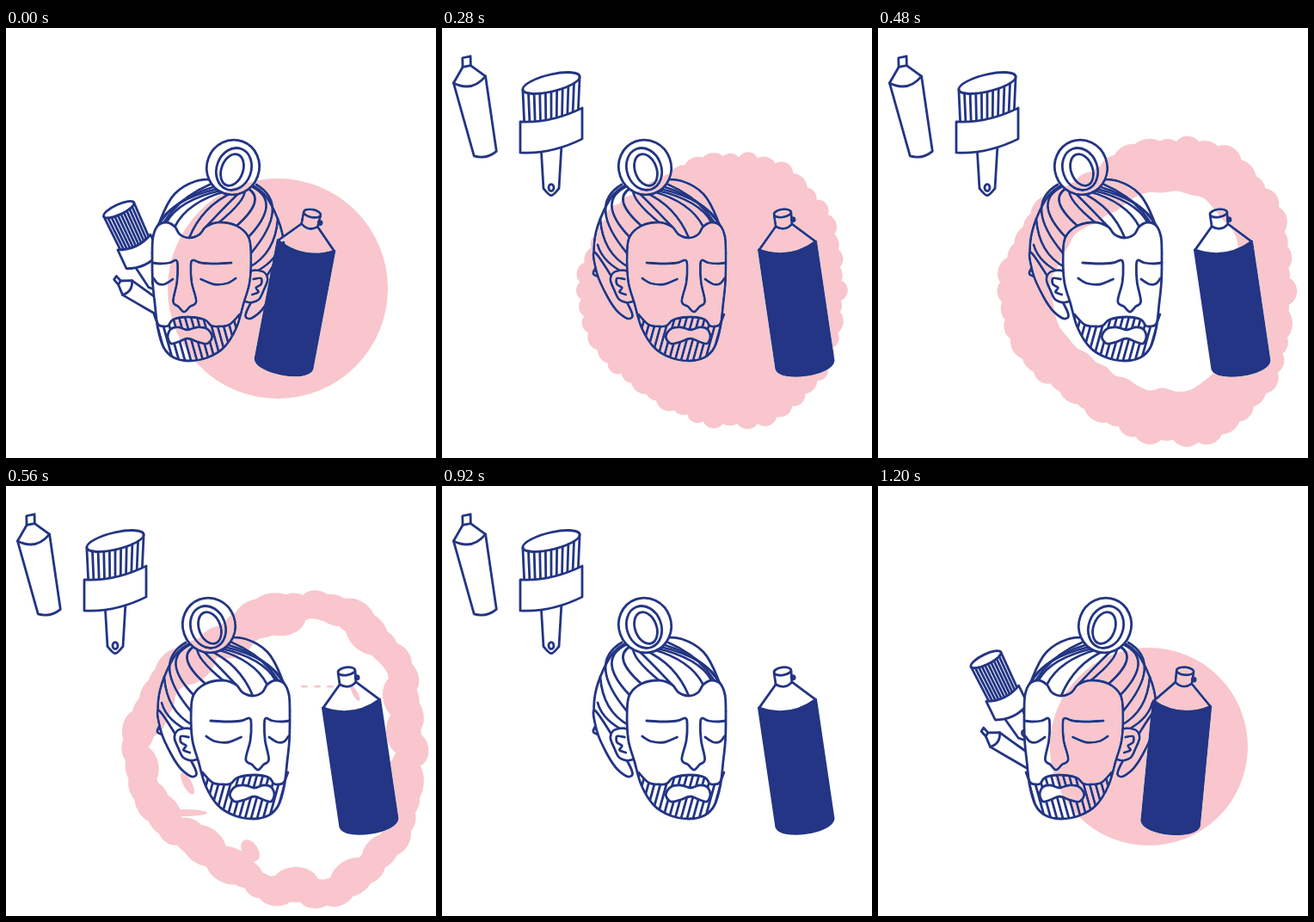
Recreate the animation shown at these times as an HTML page with a canvas. Size 500 by 500 pixels, loop 1240 ms.

```html
<!DOCTYPE html>
<html lang="en">
<head>
<meta charset="utf-8">
<title>Barber loop</title>
<style>
html, body { margin: 0; height: 100%; overflow: hidden; background: #fff; }
canvas { display: block; width: 100vw; height: 100vh; }
</style>
</head>
<body>
<canvas id="stage" width="500" height="500"></canvas>
<script>
const c = document.getElementById('stage').getContext('2d');
const BLUE = '#233584', PINK = '#f8c6cc', LOOP = 1240, TAU = Math.PI * 2, MID = 249;
const clamp = v => Math.min(1, Math.max(0, v));
const random = i => { const s = Math.sin(i * 12.9898) * 43758.5453; return s - Math.floor(s); };

// head turn (-1 left, 0 front, 1 right) | can: x, angle
// tube: x, y, angle, length, half width, bend
// brush: x, y, angle, slope, handle angle, half width, band height, tip height
const stowed  = [-1,  349, 10.7,   141, 302, -57, 60, 10, 0,      154, 260, -25, 0, -28, 21, 24, 54];
const landing = [-1,  353.5, 5.5,  136, 295, -57, 62, 10, 0,      150, 252, -26, 0, -30, 21, 24, 56];
const thrown  = [0,   388.5, -2.6, 38, 86, -17.7, 133, 17, -6,    127, 146, 0, -.2, -9.4, 35, 46, 70];
const out     = [1,   401.5, -8.4, 32, 60, -12, 88, 19, 0,        127, 119, 0, -.22, 0, 36, 36, 55];
const falling = [.5,  388.5, -2.6, 58, 162, -30, 156, 14, -10,    132, 199, -8, -.06, -24, 31, 49, 77];
const motion = [[40, stowed], [160, thrown], [280, out], [960, out], [1080, falling],
                [1170, landing], [1200, landing], [LOOP, stowed]];

function poseAt(t) {
  const i = Math.max(1, motion.findIndex(([time]) => time >= t));
  const [t0, a] = motion[i - 1], [t1, b] = motion[i];
  const k = clamp((t - t0) / (t1 - t0));
  return a.map((v, j) => v + (b[j] - v) * k);
}

// Smooth curve through points [x, y, x, y, ...]
function curve(p, closed, join) {
  const n = p.length / 2;
  const pt = i => {
    const j = closed ? (i + n) % n : Math.min(n - 1, Math.max(0, i));
    return [p[2 * j], p[2 * j + 1]];
  };
  c[join ? 'lineTo' : 'moveTo'](p[0], p[1]);
  for (let i = 0; i < n - (closed ? 0 : 1); i++) {
    const [a, b, d, e] = [pt(i - 1), pt(i), pt(i + 1), pt(i + 2)];
    c.bezierCurveTo(b[0] + (d[0] - a[0]) / 6, b[1] + (d[1] - a[1]) / 6,
      d[0] - (e[0] - b[0]) / 6, d[1] - (e[1] - b[1]) / 6, d[0], d[1]);
  }
  if (closed) c.closePath();
}

function poly(...p) {
  for (let i = 0; i < p.length; i += 2) c.lineTo(p[i], p[i + 1]);
}

function shape(build, fill) {
  c.beginPath();
  build();
  if (fill) { c.fillStyle = fill; c.fill(); }
  c.stroke();
}

function place(x, y, deg, slope, draw) {
  c.save();
  c.translate(x, y);
  c.rotate(deg * Math.PI / 180);
  c.transform(1, slope, 0, 1, 0, 0);
  draw();
  c.restore();
}

function tube(x, y, deg, len, w, bend) {
  const neck = -.18 * len, cap = neck - .12 * len, end = .7 * w, n = .25 * w;
  place(x, y, deg, 0, () => {
    shape(() => {
      c.moveTo(-n, neck);
      curve([-w, 0, bend - .85 * w, len / 2, -end, len], false, true);
      c.quadraticCurveTo(0, len + 7, end, len);
      curve([end, len, bend + .85 * w, len / 2, w, 0], false, true);
      c.lineTo(n, neck);
    }, '#fff');
    shape(() => { poly(-n, neck, -n + 2, cap, n + 2, cap, n, neck); c.closePath(); }, '#fff');
    if (bend > -5 || bend < -7) shape(() => { c.moveTo(-w, 0); c.quadraticCurveTo(0, .8 * w, w, 0); });
  });
}

function brush(x, y, deg, slope, handle, w, band, tip) {
  const h = band / 2, end = 2.1 * band, rx = .92 * w, ry = .28 * w;
  place(x, y, handle, 0, () => {
    shape(() => { c.moveTo(-13, 0); curve([-9, end - 8, 0, end, 9, end - 8], false, true); c.lineTo(13, 0); }, '#fff');
    shape(() => c.ellipse(0, end - 9, 3, 4, 0, 0, TAU));
  });
  place(x, y, deg, slope, () => {
    shape(() => { poly(-.85 * w, 0, -rx, -tip); c.ellipse(0, -tip, rx, ry, 0, Math.PI, TAU); c.lineTo(.85 * w, 0); }, '#fff');
    shape(() => c.ellipse(0, -tip, rx, ry, 0, 0, Math.PI));
    for (let k = -.8; k < .9; k += .2) shape(() => {
      c.moveTo(k * rx, -tip + ry * Math.sqrt(1 - k * k));
      c.lineTo(k * .85 * w, 0);
    });
    shape(() => {
      c.moveTo(-w, -h); c.quadraticCurveTo(0, 10 - h, w, -h);
      c.lineTo(w, h); c.quadraticCurveTo(0, h + 10, -w, h);
      c.closePath();
    }, '#fff');
  });
}

function can(x, deg) {
  place(x, 253, deg, 0, () => {
    shape(() => poly(-33, 0, -10, -24, -10, -37, 10, -37, 9, -24, 33, 0), '#fff');
    shape(() => { c.moveTo(-10, -24); c.quadraticCurveTo(0, -16, 9, -24); });
    shape(() => c.ellipse(0, -38, 10, 4.5, 0, 0, TAU), '#fff');
    shape(() => c.arc(11, -29, 2, 0, TAU), BLUE);
    shape(() => {
      c.moveTo(-33.5, 0); c.quadraticCurveTo(0, 18, 33.5, 0);
      c.lineTo(33.5, 140); c.bezierCurveTo(30, 156, -30, 156, -33.5, 140);
      c.closePath();
    }, BLUE);
  });
}

// Left halves, x measured from the middle of the face
const FACE = [0,244, -12,240, -19,231, -32,226, -48,230, -58,243, -60,262, -59,295, -54,320,
              -48,348, -37,371, -21,383, 0,387];
const HAIR = [0,176, -27,178, -52,193, -68,222, -75,250, -73,275, -64,290];
const LOCK = [-73,262, -72,285, -65,312, -60,330, -51,338, -44,325];
const EAR = [-58,285, -69,283, -73,292, -70,305, -66,316, -58,319, -53,312];
const EAR_FOLD = [-62,292, -68,291, -68,298, -64,302, -66,307, -61,310];
const EYE = [-51,291, -43,297, -31,298, -18,292];
const BEARD = [-52,333, -43,345, -33,347, -26,346, -19,339, 0,336];
const MOUTH = [0,351, -11,348, -22,350, -27,359, -22,367, -12,365, 0,361];

const mirror = p => p.map((v, i) => i % 2 ? v : -v);
function both(half) {
  const p = half.slice();
  for (let i = half.length - 2; i >= 0; i -= 2) if (half[i]) p.push(-half[i], half[i + 1]);
  return p;
}

// Front view slid sideways by q over the round skull; a left turn is the mirror image
function head(turn) {
  const q = Math.abs(turn);
  const faceX = x => MID + x + q * (38 - x / 23 - x * x / 250);
  const hairX = (x, y) => MID + x + q * (3 + .005 * Math.max(0, y - 280) ** 2);
  const map = (p, f) => p.map((v, i) => i % 2 ? v : f(v, p[i + 1]));
  const onFace = (p, depth = 0) => map(p, x => faceX(x) + depth * q);
  const line = p => shape(() => curve(p));
  const blob = p => shape(() => curve(p, true), '#fff');
  const bunX = 247 - 11 * q * q, bunY = 159 + 3 * q;

  c.save();
  if (turn < 0) { c.translate(500, 0); c.scale(-1, 1); }

  blob(map(both(HAIR), hairX));
  for (let j = -6; j <= 6; j++) {
    const n = 2 * Math.abs(j);
    if (n === 2) continue;
    const x0 = bunX + 4.5 * j, y0 = 191 - .25 * j * j;
    const x1 = faceX(-Math.sign(j) * FACE[n]), y1 = FACE[n + 1];
    shape(() => {
      c.moveTo(x0, y0);
      c.quadraticCurveTo(.3 * x0 + .7 * x1 + 1.5 * j + 6 * q * Math.min(0, j), y0 + .3 * (y1 - y0), x1, y1);
    });
  }
  for (let k = 0; k < 3; k++) shape(() => {
    c.moveTo(hairX(-68 - 3 * k, 0), 222 + 30 * k);
    c.quadraticCurveTo(182 + 5 * q, 262 + 12 * k, 189 + 28 * q, 278 + 9 * k);
  });

  const far = p => map(mirror(p), x => MID + x - 40 * q);
  blob(far(LOCK)); blob(far(EAR)); line(far(EAR_FOLD));
  blob(map(LOCK, hairX)); blob(onFace(EAR)); line(onFace(EAR_FOLD));

  const face = onFace(both(FACE)), edge = onFace(both(BEARD), 2), mouth = onFace(both(MOUTH), 2);
  blob(face);
  line(onFace(EYE, 5));
  line(onFace(mirror(EYE), 3));
  line(onFace(both([-48,273, -34,265 + 9 * q, -19,262 + 11 * q, -10,266 + 4 * q, -8,277,
                    -9,296, -14,318, -7,324, 0,330]), 6));

  c.save();
  c.beginPath(); curve(face, true); c.clip();
  c.beginPath(); curve(edge); poly(340, 346, 340, 400, 180, 400); c.closePath();
  curve(mouth, true); c.clip('evenodd');
  for (let x = 190; x < 350; x += 7) shape(() => {
    c.moveTo(x, 325);
    c.lineTo(x + (248 - x) * .15 * (1 - q) - 18 * q, 390);
  });
  c.restore();
  line(edge);
  shape(() => curve(mouth, true));

  // bun
  for (const [dx, dy, rx, ry] of [[0, 0, 30.5, 32], [2 - 3 * q, 2, 25 - 5 * q, 25], [1, 3, 15.5 - 3 * q, 19]])
    shape(() => c.ellipse(bunX + dx, bunY + dy, rx, ry, -.35 * q, 0, TAU), '#fff');
  c.restore();
}

function dot(x, y, rx, ry = rx, turn = 0) {
  c.beginPath();
  c.ellipse(x, y, rx, ry, turn, 0, TAU);
  c.fill();
}

// A disc swells into puffs, opens from the middle and breaks into droplets
function cloud(t) {
  const since = t - 400;
  const spread = Math.sin(clamp((t - 160) / 240) * Math.PI / 2);
  const stretch = 1 + Math.max(0, since) * .0003;
  const puff = 24 * spread * (1 - clamp(since / 310) ** 2);
  const share = .5 * clamp(since / 160) * clamp((880 - t) / 160);
  const long = 1 + clamp((t - 480) / 240);
  const hole = t > 360 ? 1 - Math.exp((360 - t) / 115) : 0;
  const cx = 316, cy = 303 + 3 * spread, n = 48, rim = [], gap = [];
  for (let i = 0; i < n; i++) {
    const a = i / n * TAU, cos = Math.cos(a), sin = Math.sin(a);
    const far = 164 + 12 * Math.cos(3 * a - Math.PI) + 6 * cos + 10 * random(i + 1);
    const r = (128 + (far - 128) * spread) * stretch;
    const b = puff * (.7 + .4 * random(i + 60)) + share * (2 + 11 * random(i + 120) ** 2);
    rim.push(cx + (r - b) * cos, cy + (r - b) * sin);
    gap.push(cx + r * hole * cos, cy + r * hole * sin);
    dot(cx + (r - b) * cos, cy + (r - b) * sin, b * long, b, a + Math.PI / 2 + (long - 1) * (random(i) - .5));
  }
  if (t <= 600) {
    c.beginPath();
    curve(rim, true);
    if (hole) curve(gap, true);
    c.fill('evenodd');
  }
  const k = clamp((800 - t) / 240);
  if (t >= 520) {
    for (let i = 0; i < 3; i++) dot(347 + 15 * i, 233, 4 * k, 1.5 * k);
    dot(206, 380, 28 * k, 4 * k);
    dot(284, 424, 9 * k, 14 * k, -.6);
    dot(211, 346, 5 * k, 14 * k, -.5);
    dot(406, 241, 3 * k, 10 * k, -.5);
  }
}

function paint(now) {
  const ms = now % LOOP, t = ms < 80 ? 0 : Math.floor(ms / 40) * 40;
  const pose = poseAt(t);
  c.globalCompositeOperation = 'source-over';
  c.fillStyle = '#fff';
  c.fillRect(0, 0, 500, 500);
  c.strokeStyle = BLUE;
  c.lineWidth = 2.8;
  c.lineCap = c.lineJoin = 'round';
  tube(...pose.slice(3, 9));
  brush(...pose.slice(9));
  head(pose[0]);
  can(pose[1], pose[2]);

  // pink tints the white areas only
  c.globalCompositeOperation = 'darken';
  c.fillStyle = PINK;
  if (t >= 1080) {
    const r = 128 - 119 * (1 - (t - 1080) / 160) ** 1.6;
    dot(312 + r / 40, 309 - Math.min(6, r / 19), r);
  } else if (t <= 160) dot(316, 303, 128);
  else if (t < 880) cloud(t);
}

function tick() {
  paint(performance.now());
  requestAnimationFrame(tick);
}
tick();
</script>
</body>
</html>
```
